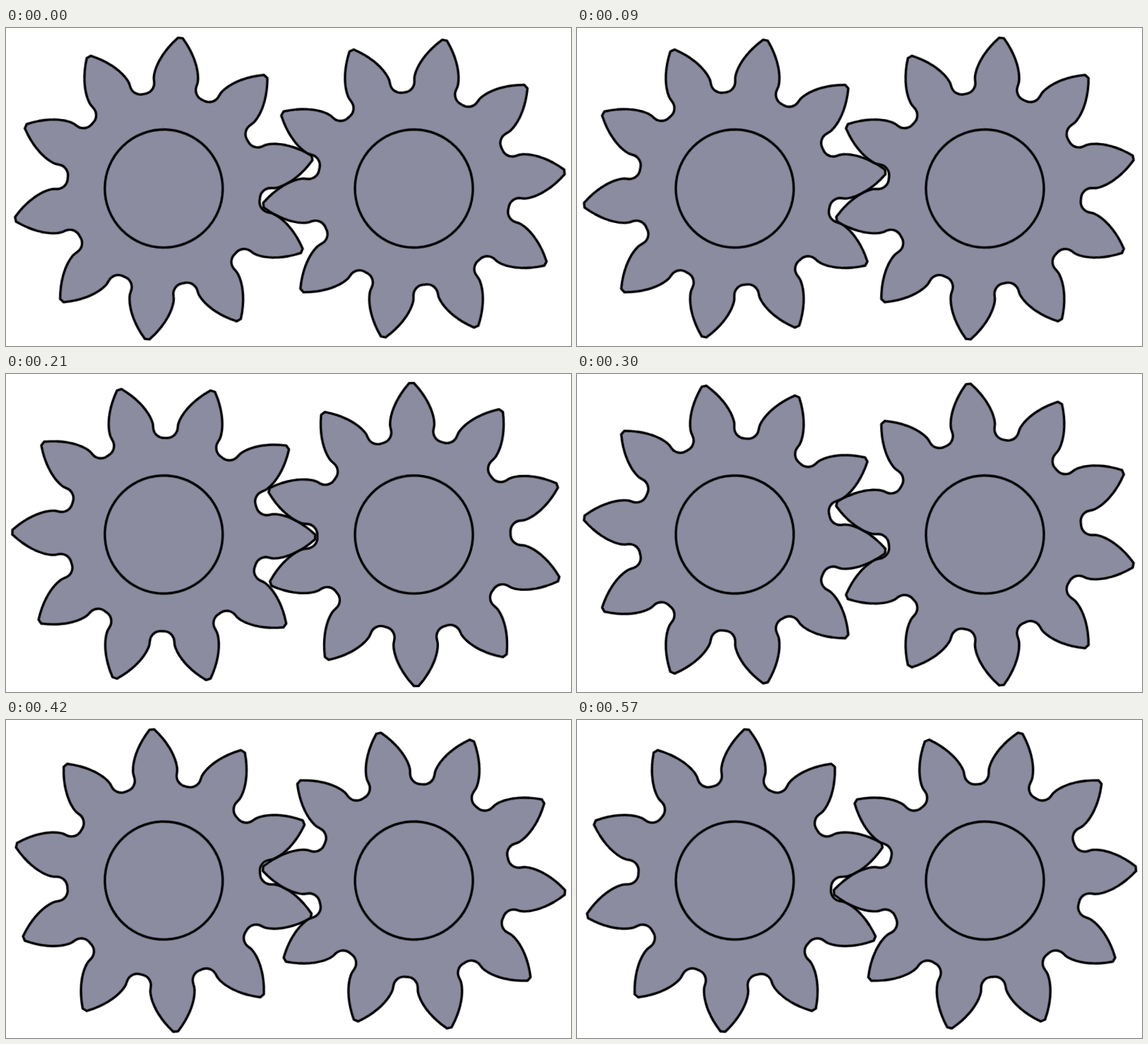
An HTML page that plays this animation: 800 px wide and 450 px high, repeating every 0.6 s.

```html
<!DOCTYPE html>
<html lang="en">
<head>
<meta charset="utf-8">
<title>Meshing gears</title>
<style>
  html, body { margin: 0; width: 100%; height: 100%; overflow: hidden; background: #fff; }
  svg { display: block; width: 800px; height: 450px; }
  .gear {
    fill: #8c8ca0;
    stroke: #000;
    stroke-width: 3.4;
    stroke-linejoin: round;
    animation: 600ms steps(20) infinite;
  }
  .left { animation-name: clockwise; }
  .right { animation-name: counter; }
  @keyframes clockwise { from { transform: rotate(6.3deg); } to { transform: rotate(42.3deg); } }
  @keyframes counter { from { transform: rotate(11.7deg); } to { transform: rotate(-24.3deg); } }
</style>
</head>
<body>
<svg viewBox="0 0 800 450">
  <g transform="translate(223.4 227.2)">
    <g class="gear left"><path/><circle r="83.5"/></g>
  </g>
  <g transform="translate(577.6 227.2)">
    <g class="gear right"><path/><circle r="83.5"/></g>
  </g>
</svg>
<script>
  const TEETH = 10;
  const STEP = 2 * Math.PI / TEETH;
  const PITCH = 177.1, TIP = 214.4, ROOT = 136.8, FILLET = 15;
  const PRESSURE = 28 * Math.PI / 180;
  const BASE = PITCH * Math.cos(PRESSURE);
  const FLANK_POINTS = 16;

  const involute = a => Math.tan(a) - a;
  const halfAtBase = STEP / 4 + involute(PRESSURE);

  // Half the tooth's angular width at radius r, outside the base circle.
  const halfWidth = r => halfAtBase - involute(Math.acos(Math.min(1, BASE / r)));

  // Polar point, with the angle measured clockwise from the top.
  const polar = (r, a) => `${(r * Math.sin(a)).toFixed(2)} ${(-r * Math.cos(a)).toFixed(2)}`;

  function gearPath() {
    const flank = Array.from({ length: FLANK_POINTS + 1 },
      (_, i) => BASE + (TIP - BASE) * (i / FLANK_POINTS) ** 2);
    const filletCentre = ROOT + FILLET;
    const filletAngle = Math.asin(FILLET / filletCentre);
    const filletTop = filletCentre * Math.cos(filletAngle);
    const floorAngle = halfAtBase + filletAngle;
    const arc = (radius, sweep, end) => `A${radius} ${radius} 0 0 ${sweep} ${end}`;

    let d = '';
    for (let i = 0; i < TEETH; i++) {
      const mid = i * STEP, next = mid + STEP;
      const rise = flank.map(r => polar(r, mid - halfWidth(r)));
      const fall = flank.map(r => polar(r, mid + halfWidth(r))).reverse();
      d += (i ? 'L' : 'M') + [...rise, ...fall].join('L');
      d += 'L' + polar(filletTop, mid + halfAtBase);
      d += arc(FILLET, 0, polar(ROOT, mid + floorAngle));
      d += arc(ROOT, 1, polar(ROOT, next - floorAngle));
      d += arc(FILLET, 0, polar(filletTop, next - halfAtBase));
    }
    return d + 'Z';
  }

  const outline = gearPath();
  document.querySelectorAll('path').forEach(p => p.setAttribute('d', outline));
</script>
</body>
</html>
```
